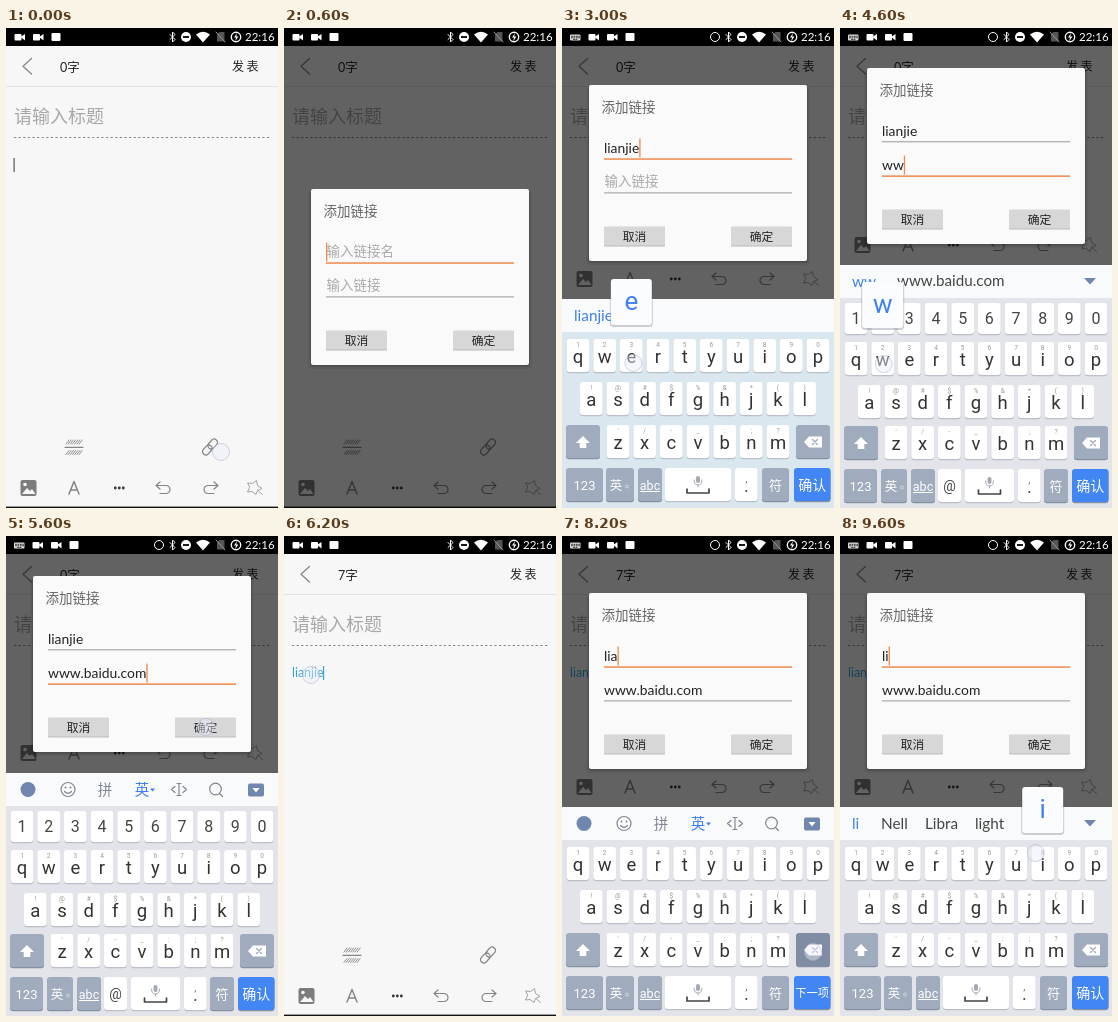
Animation of 272 by 480 pixels, one loop 9.8 s. Source, as an HTML page:

```html
<!DOCTYPE html>
<html lang="zh-CN">
<head>
<meta charset="utf-8">
<style>
html, body { margin: 0; width: 100%; height: 100%; overflow: hidden; background: #f7f7f7; }
svg { display: block; width: 272px; height: 480px; }
text { font-family: Lato, "Noto Sans CJK SC", "Noto Sans CJK", "Noto Sans CJK JP", sans-serif; white-space: pre; }
text.key { font-family: Roboto, "Noto Sans CJK SC", "Noto Sans CJK", "Noto Sans CJK JP", sans-serif; }
text.strong { font-weight: 500; }
</style>
</head>
<body>
<svg id="stage" viewBox="0 0 272 480" xmlns="http://www.w3.org/2000/svg"></svg>
<script>
const LOOP = 9800, STEP = 200;
const BLUE = '#3f80ee', ORANGE = '#f0894e', SLATE = '#a0abbd', ICON = '#858585';
const stage = document.getElementById('stage');
const pen = document.createElement('canvas').getContext('2d');

// Linear track through [time, value] points
function track(points, t) {
  let [t0, v0] = points[0];
  for (const [t1, v1] of points) {
    if (t <= t1) return t1 === t0 ? v1 : v0 + (v1 - v0) * (t - t0) / (t1 - t0);
    t0 = t1;
    v0 = v1;
  }
  return v0;
}

const KEYBOARD_Y = [[0, 480], [600, 480], [800, 400], [1000, 290], [1200, 271], [3600, 271], [3800, 237],
  [5600, 237], [5800, 400], [6000, 480], [6600, 480], [6800, 350], [7000, 275], [7200, 271]];
const DIALOG_Y = [[0, 161], [800, 161], [1000, 75], [1200, 57], [3600, 57], [3800, 40],
  [5800, 40], [6000, 161], [6800, 161], [7000, 83], [7200, 57]];
const DIM = [[200, 0], [400, .35], [600, .6], [5600, .6], [5800, .2], [6000, 0],
  [6400, 0], [6600, .35], [6800, .6]];
const DIALOG_ALPHA = [[200, 0], [400, .7], [600, 1], [5600, 1], [5800, 0], [6400, 0], [6600, .8], [6800, 1]];

// time, key, touch offset from the key centre
const PRESSES = [[1600, 'l'], [1800, 'i'], [2000, 'a'], [2200, 'n'], [2600, 'j'], [2800, 'i'], [3000, 'e', 2, 7],
  [4200, 'w'], [4600, 'w'], [9200, 'l'], [9600, 'i', -7, -11]];
// time, x, y
const TOUCHES = [[0, 215, 424], [3600, 100, 154], [5000, 110, 254], [5600, 200, 191], [6200, 27, 139], [6800, 110, 222]];

const typed = (t, from, to) =>
  PRESSES.filter(p => p[0] >= from && p[0] < to && p[0] <= t).map(p => p[1]).join('');

function stateAt(t) {
  const s = { name: '', url: '', draft: '', focus: 0, erase: false };
  if (t < 6000) {
    s.name = typed(t, 1600, 3600);
    s.url = t >= 5200 ? 'www.baidu.com' : typed(t, 3800, 5200);
    s.focus = t >= 3600 ? 1 : 0;
    if (t < 3400) s.draft = s.name;
    else if (t < 5200) s.draft = s.url;
  } else {
    s.url = 'www.baidu.com';
    const gone = Math.max(0, Math.floor((t - 7400) / 200));
    s.draft = typed(t, 9000, LOOP);
    s.name = 'lianjie'.slice(0, Math.max(0, 7 - gone)) + s.draft;
    s.erase = gone > 0 && gone <= 7;
  }
  s.press = PRESSES.find(p => p[0] === t);
  s.digits = t >= 3800 && t < 6400;
  s.linked = t >= 5800;
  s.keyboard = track(KEYBOARD_Y, t);
  s.shift = t < 1000 || (t >= 5800 && t < 6800) ? 0 : s.digits ? 243 : 209;
  return s;
}

// Drawing helpers
const esc = s => s.replace(/&/g, '&amp;').replace(/</g, '&lt;');
const text = (x, y, s, size, fill = '#333', more = '') =>
  `<text x="${x}" y="${y + size * .36}" font-size="${size}" fill="${fill}" ${more}>${esc(s)}</text>`;
const mid = (x, y, s, size, fill, cls = 'key') => text(x, y, s, size, fill, `text-anchor="middle" class="${cls}"`);
const rect = (x, y, w, h, fill, r = 0, more = '') =>
  `<rect x="${x}" y="${y}" width="${w}" height="${h}" rx="${r}" fill="${fill}" ${more}/>`;
const line = (d, color = ICON, w = 1.2, more = '') =>
  `<path d="${d}" fill="none" stroke="${color}" stroke-width="${w}" stroke-linecap="round" stroke-linejoin="round" ${more}/>`;
const shape = (d, fill) => `<path d="${d}" fill="${fill}"/>`;
const disc = (x, y, r, fill, more = '') => `<circle cx="${x}" cy="${y}" r="${r}" fill="${fill}" ${more}/>`;
const ring = (x, y, r, color, w = 1.2) => disc(x, y, r, 'none', `stroke="${color}" stroke-width="${w}"`);
const place = (transform, body, more = '') => `<g transform="${transform}" ${more}>${body}</g>`;
const move = (x, y, body, more) => place(`translate(${x} ${y})`, body, more);
function width(s, size) {
  pen.font = `${size}px Lato, sans-serif`;
  return pen.measureText(s).width;
}

function statusBar(open) {
  const camera = x => rect(x, 6, 7, 6.5, '#fff', 1) + shape(`M${x + 6} 9l4.5-3v6.5z`, '#fff');
  const dx = open ? 18 : 0;
  let out = rect(0, 0, 272, 18, '#000');
  if (open) {
    out += rect(8, 6.5, 10.5, 6, '#ddd', 1) + line('M9.5 8.3h8M9.5 9.8h8M11.5 11.4h4', '#000', .8, 'stroke-dasharray="1 1.4"');
    out += ring(153, 9, 4.5, '#fff', 1);
  }
  out += camera(8.5 + dx) + camera(27 + dx) + rect(45.5 + dx, 5, 9, 8, '#fff', 1);
  out += line('M164 6.5l5 5-2.5 2.5v-10l2.5 2.5-5 5', '#fff', 1);
  out += disc(180, 9, 5, '#fff') + rect(177, 8.1, 6, 1.8, '#000');
  out += shape('M190 6.5q7-5.5 14 0l-7 8z', '#fff');
  out += shape('M211 13.5v-7l2.5-2.5h5v9.5z', '#555') + line('M210 4l9 10', '#999', 1);
  out += ring(230, 9, 4.7, '#fff', 1.4) + shape('M231 5l-3 4.6h2l-.8 3.6 3.2-4.8h-2.2z', '#fff');
  return out + text(239, 9, '22:16', 11.5, '#fff');
}

function toolbar() {
  const arrow = line('M-4 -6l-4 3.5 4 3.5M-7.5 -2.5h9.5a4 4 0 0 1 0 8h-6');
  const loop = x => rect(x, -3.3, 11, 6.6, 'none', 3.3, `stroke="${ICON}" stroke-width="1.3"`);
  let hatch = '';
  for (let x = 60; x < 74; x += 2.2) hatch += `M${x} 416l3-4M${x} 426.5l3-4`;
  return line('M59 419.3h18') + line(hatch, ICON, .9) +
    place('translate(204 419) rotate(-48)', loop(-9.5) + loop(-1.5)) +
    rect(14.5, 452, 16, 16, '#7c7c7c', 2) + shape('M16 466l5-6 3 3 2-2 3.5 5z', '#f7f7f7') + disc(19, 456.5, 1.8, '#f7f7f7') +
    line('M63 466l5-12.5 5 12.5M65 462h6', ICON, 1.5) +
    [109.3, 113.3, 117.3].map(x => disc(x, 460, 1.4, '#333')).join('') +
    move(158, 460, arrow) + place('translate(204 460) scale(-1 1)', arrow) +
    line('M242 455l4.5.5 4-3 1 5 4.5 3-4.5 2-1.5 4-4-3-4.5.5 2-4.5zM252 462.5l4.5 4', '#999', .9);
}

function editor(s, t) {
  const size = 12.4;
  let out = rect(0, 0, 272, 480, '#f7f7f7') + rect(0, 58, 272, 1, '#e2e2e2');
  out += line('M25.5 30.5l-8.5 7.8 8.5 7.8', '#888', 1.3);
  out += text(54, 39, s.linked ? '7字' : '0字', 12.5, '#222');
  out += text(226, 39, '发', 12, '#222') + text(240.5, 39, '表', 12, '#222');
  out += text(8, 88.5, '请输入标题', 18, '#a8a8a8');
  out += line('M8 109.5h257', '#858585', 1.2, 'stroke-dasharray="2.2 2.4" style="stroke-linecap:butt"');
  const body = s.linked ? 'lianjie' : '';
  if (body) out += text(8, 136.5, body, size, '#35a3dc');
  if (s.linked || t < 400) out += rect(7.5 + width(body, size), 130, 1.2, 14, s.linked ? '#35a3dc' : '#555');
  return out + move(0, -s.shift, toolbar()) + rect(0, 478.6, 272, 1.4, '#111');
}

function dialog(s, t) {
  const size = 13.9;
  const field = (i, y, value, hint) => {
    const on = s.focus === i, x = 42 + width(value, size);
    let out = value ? text(42, y, value, size, '#222') : text(42.5, y, hint, 13.5, '#aaa');
    out += rect(42, y + 10.8, 188, on ? 1.5 : 1, on ? ORANGE : '#999');
    if (on) out += rect(x, y - 9, 1.3, 19, ORANGE);
    if (on && t >= 6900 && t < 7600) out += disc(x + .6, y + 20.5, 7.5, ORANGE) + shape(`M${x + .6} ${y + 11}l5 5h-10z`, ORANGE);
    return out;
  };
  const button = (x, label) =>
    rect(x, 142, 61, 19.5, '#bbb', 1) + rect(x, 141.5, 61, 19, '#d7d7d7', 1) + mid(x + 30.5, 151.5, label, 11.8, '#222', 'strong');
  return rect(24, 2, 224, 178, 'rgba(0,0,0,.06)', 4) + rect(26, 1, 220, 177, 'rgba(0,0,0,.14)', 3) +
    rect(27, 0, 218, 176, '#fafafa', 2) + text(39.5, 22.5, '添加链接', 13.5, '#666') +
    field(1, 96.6, s.url, '输入链接') + field(0, 62.5, s.name, '输入链接名') +
    button(42, '取消') + button(169, '确定');
}

const ROWS = [['qwertyuiop', 16], ['asdfghjkl', 29.3], ['zxcvbnm', 56]];
const MARKS = ['1234567890', '!@#$%&*()', "'/-_:;?"];
const rowTops = digits => digits ? [314, 357, 398, 441] : [311, 354, 397, 440];

function keyCentre(ch, digits) {
  const r = ROWS.findIndex(row => row[0].includes(ch));
  return [ROWS[r][1] + ROWS[r][0].indexOf(ch) * 26.67, rowTops(digits)[r] + 17];
}

const key = (x, y, w, h, fill = '#fff') =>
  rect(x, y + 1.2, w, h, fill === '#fff' ? '#b9bec8' : '#8690a3', 3) + rect(x, y, w, h, fill, 3);

function bar(s, y) {
  let out = rect(0, y, 272, 33, '#f9fafb');
  const arrow = shape(`M244 ${y + 13}h12l-6 6.5z`, '#7085ad');
  if (s.draft) {
    out += text(12, y + 16, s.draft, 15.3, BLUE);
    if (s.draft === 'li') out += [[41, 'Nell'], [85, 'Libra'], [135, 'light']].map(w => text(w[0], y + 16, w[1], 15.3, '#444')).join('');
    if (s.digits) out += text(57, y + 16, 'www.baidu.com', 15.2, '#444');
    return out + (s.digits || s.draft === 'li' ? arrow : '');
  }
  const c = '#7f8794', m = y + 16.5;
  return out + disc(22, m, 7.5, '#7187b0') +
    ring(62, m, 7, c) + disc(59.5, m - 2, 1, c) + disc(64.5, m - 2, 1, c) + line(`M58.5 ${m + 2}q3.5 3.5 7 0`, c) +
    mid(99, m, '拼', 14.5, c) + mid(136, m, '英', 14.5, BLUE) + shape(`M144 ${m - 1}h5l-2.5 3z`, BLUE) +
    line(`M173 ${m - 6}v12M171 ${m - 6}h4M171 ${m + 6}h4M169 ${m - 3}l-3.5 3 3.5 3M177 ${m - 3}l3.5 3-3.5 3`, c) +
    ring(209.5, m - .5, 5.8, c) + line(`M213.5 ${m + 4}l3 3`, c) +
    rect(242, m - 6, 16, 13, '#7187b0', 2) + shape(`M246.5 ${m - 1.5}h7l-3.5 4.5z`, '#fff');
}

function keyboard(s, t) {
  const top = s.digits ? 237 : 271, tops = rowTops(s.digits);
  const tint = t >= 1600 && t < 3600 ? '#dae7ef' : '#e2e4e9';
  let out = rect(0, top, 272, 480 - top, tint) + bar(s, top);
  if (s.digits) [...'1234567890'].forEach((d, i) => {
    const x = 16 + i * 26.67;
    out += key(x - 11.3, 275, 22.6, 31) + mid(x, 290, d, 16, '#444');
  });
  ROWS.forEach(([letters], r) => [...letters].forEach((ch, i) => {
    const [x, y] = keyCentre(ch, s.digits);
    out += key(x - 11.3, y - 17, 22.6, 33) + mid(x, y + .6, ch, 18.5, '#333');
    out += mid(x, y - 11, MARKS[r][i], 6.5, '#999');
  }));
  const z = tops[2], b = tops[3], zm = z + 17;
  out += key(4, z, 34, 33, SLATE) + shape(`M21 ${zm - 6}l7 7h-3.7v5h-6.6v-5h-3.7z`, '#fff');
  out += key(234, z, 34, 33, s.erase ? '#7f8ca3' : SLATE) + shape(`M242 ${zm}l5-5.5h13v11h-13z`, '#fff') + line(`M250.5 ${zm - 2.5}l5 5m0-5l-5 5`, SLATE, 1.4);

  const f = s.digits, h = 33, m = b + 17;
  const gray = (x, w, label, size) => key(x, b, w, h, SLATE) + mid(x + w / 2, m, label, size, '#fff');
  out += f ? gray(4, 33, '123', 13) + gray(41, 26, '', 13) + gray(71, 24, 'abc', 12.5)
    : gray(4, 37, '123', 13) + gray(44, 28, '', 13) + gray(76, 24, 'abc', 12.5);
  const ex = f ? 51 : 54, ax = f ? 83 : 88;
  out += mid(ex, m, '英', 12.5, '#fff') + mid(ex + 11, m + 1, '中', 5, '#dde2ea') + rect(ax - 10, m + 6, 20, 1, '#fff');
  if (f) out += key(98, b, 23, h) + mid(109.5, m, '@', 14, '#444');
  const sx = f ? 125 : 103, sw = f ? 49 : 66, c = sx + sw / 2;
  out += key(sx, b, sw, h) + rect(c - 2, m - 9, 4, 7, '#a4a9b2', 2) + line(`M${c - 4} ${m - 5}q0 5 4 5t4-5M${c} ${m}v2`, '#a4a9b2', 1) +
    line(`M${c - 11} ${m + 4}v4h22v-4`, '#444', 1.7);
  const dot = f ? 178 : 173;
  out += key(dot, b, 22.6, h) + mid(dot + 11.3, m + 1, '.', 18, '#444') + mid(dot + 11.3, m - 7, ',', 11, '#777');
  out += f ? gray(204, 24, '符', 13) : gray(200, 27, '符', 13);
  const confirm = s.draft || f;
  out += key(232, b, 36.5, h, '#4285f4') + mid(250.2, m, confirm ? '确认' : '下一项', confirm ? 14 : 11.3, '#fff', 'key strong');
  const drop = s.keyboard - top;
  return move(0, drop, out, `opacity="${Math.max(.5, 1 - drop * .03)}"`);
}

const touch = (x, y) => disc(x, y, 8.5, 'rgba(235,238,248,.45)', 'stroke="#aab2d0" stroke-opacity=".55" stroke-width="1"');

function pressed(s) {
  const [, ch, dx = 1, dy = 5] = s.press;
  const [x, y] = keyCentre(ch, s.digits);
  return touch(x + dx, y + dy) + rect(x - 21.5, y - 76, 43, 47, 'rgba(60,70,90,.25)', 4) +
    rect(x - 20.5, y - 77, 41, 46, '#fbfcfd', 3) + mid(x, y - 55.5, ch, 26, BLUE);
}

function draw(t) {
  const s = stateAt(t), dim = track(DIM, t), alpha = track(DIALOG_ALPHA, t);
  const tap = TOUCHES.find(p => p[0] === t);
  let out = editor(s, t);
  if (dim > 0) out += rect(0, 18, 272, 462, '#000', 0, `opacity="${dim}"`);
  if (alpha > 0) out += move(0, track(DIALOG_Y, t), dialog(s, t), `opacity="${alpha}"`);
  if (s.keyboard < 480) out += keyboard(s, t);
  if (s.press) out += pressed(s);
  if (s.erase) out += touch(251, 416);
  if (tap) out += touch(tap[1], tap[2]);
  stage.innerHTML = out + statusBar(s.keyboard < 480);
}

const start = performance.now();
let shown = -1;
function tick() {
  const t = Math.floor((performance.now() - start) % LOOP / STEP) * STEP;
  if (t !== shown) draw(shown = t);
  requestAnimationFrame(tick);
}
tick();
</script>
</body>
</html>
```
